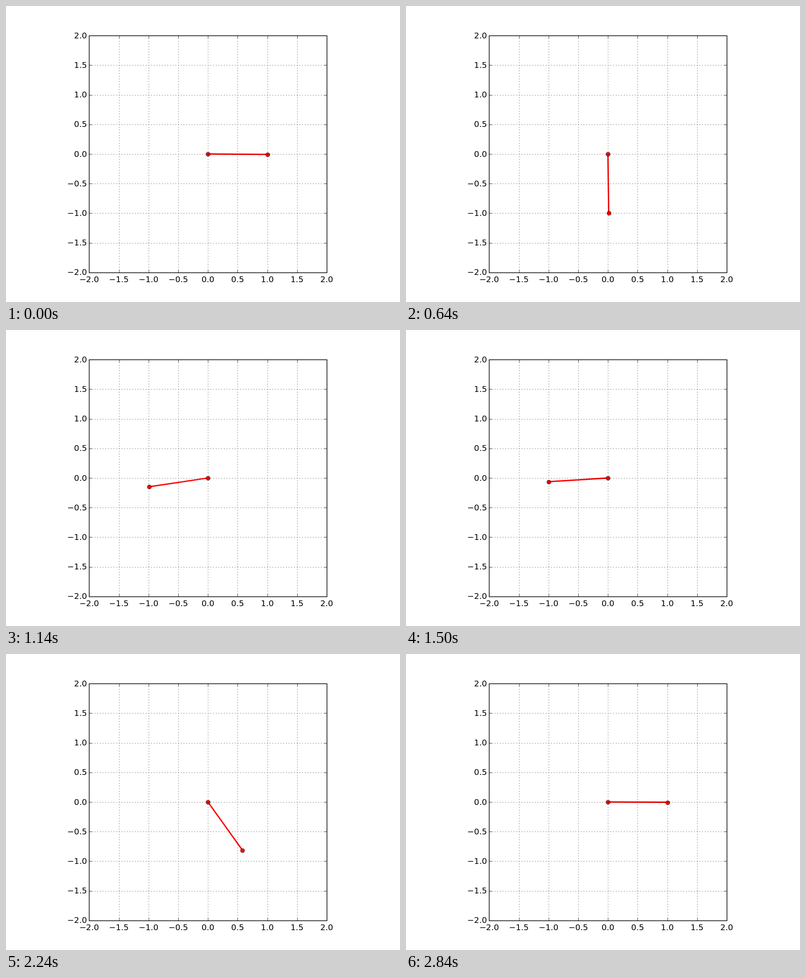
Animation, 812 px wide and 612 px high, one loop 2860 ms. Source, as an HTML page with a canvas:

```html
<!DOCTYPE html>
<html lang="en">
<head>
<meta charset="utf-8">
<title>Pendulum</title>
<style>
html, body { margin: 0; width: 100%; height: 100%; overflow: hidden; background: #fff; }
canvas { display: block; }
</style>
</head>
<body>
<canvas id="stage" width="812" height="612"></canvas>
<script>
const ctx = document.getElementById('stage').getContext('2d');
const W = 812, H = 612;
const PT = 100 / 72;
const UNIT = 122.4, CX = 416.15, CY = 306;
const FRAMES = 143, FRAME_MS = 20;
const VALUES = [-2, -1.5, -1, -0.5, 0, 0.5, 1, 1.5, 2];

const px = v => CX + v * UNIT;
const py = v => CY - v * UNIT;
const snap = v => Math.round(v) + 0.5;
const LEFT = snap(px(-2)), RIGHT = snap(px(2));
const TOP = snap(py(2)), BOTTOM = snap(py(-2));

// Free swing from rest just above horizontal; angle measured downwards from +x.
function swing() {
  const g = 9.81, sub = 100, h = 1 / (60 * sub), lead = 341;
  const angles = [];
  let a = -0.0086, v = 0;
  for (let i = 0; angles.length < FRAMES; i++) {
    if (i >= lead && (i - lead) % sub === 0) angles.push(a);
    v += g * Math.cos(a) * h / 2;
    a += v * h;
    v += g * Math.cos(a) * h / 2;
  }
  return angles;
}
const angles = swing();

function line(x1, y1, x2, y2) {
  ctx.beginPath();
  ctx.moveTo(x1, y1);
  ctx.lineTo(x2, y2);
  ctx.stroke();
}

function dot(x, y) {
  ctx.beginPath();
  ctx.arc(snap(x), snap(y), 4.1, 0, Math.PI * 2);
  ctx.fillStyle = '#f00';
  ctx.fill();
  ctx.strokeStyle = '#000';
  ctx.lineWidth = 0.5 * PT;
  ctx.stroke();
}

function pendulum(a) {
  const x = px(Math.cos(a)), y = py(-Math.sin(a));
  ctx.strokeStyle = '#f00';
  ctx.lineWidth = 2 * PT;
  line(CX, CY, x, y);
  dot(CX, CY);
  dot(x, y);
}

function axes() {
  const tick = 4 * PT;
  ctx.strokeStyle = '#000';
  ctx.lineWidth = 0.5 * PT;
  for (const v of VALUES) {
    const x = snap(px(v)), y = snap(py(v));
    ctx.setLineDash([PT, 3 * PT]);
    line(x, BOTTOM, x, TOP);
    line(LEFT, y, RIGHT, y);
    ctx.setLineDash([]);
    line(x, BOTTOM, x, BOTTOM - tick);
    line(x, TOP, x, TOP + tick);
    line(LEFT, y, LEFT + tick, y);
    line(RIGHT, y, RIGHT - tick, y);
  }
  ctx.lineWidth = PT;
  ctx.strokeRect(LEFT, TOP, RIGHT - LEFT, BOTTOM - TOP);
}

function labels() {
  ctx.font = '16.67px "DejaVu Sans", sans-serif';
  ctx.fillStyle = '#000';
  ctx.textBaseline = 'alphabetic';
  for (const v of VALUES) {
    const text = v.toFixed(1).replace('-', '\u2212');
    ctx.textAlign = 'center';
    ctx.fillText(text, px(v), 571);
    ctx.textAlign = 'right';
    ctx.fillText(text, 166.8, Math.round(py(v) + 5.5));
  }
}

function draw(ms) {
  ctx.fillStyle = '#fff';
  ctx.fillRect(0, 0, W, H);
  pendulum(angles[Math.floor(ms / FRAME_MS) % FRAMES]);
  axes();
  labels();
}

const start = performance.now();
function loop() {
  draw(performance.now() - start);
  requestAnimationFrame(loop);
}
loop();
</script>
</body>
</html>
```
